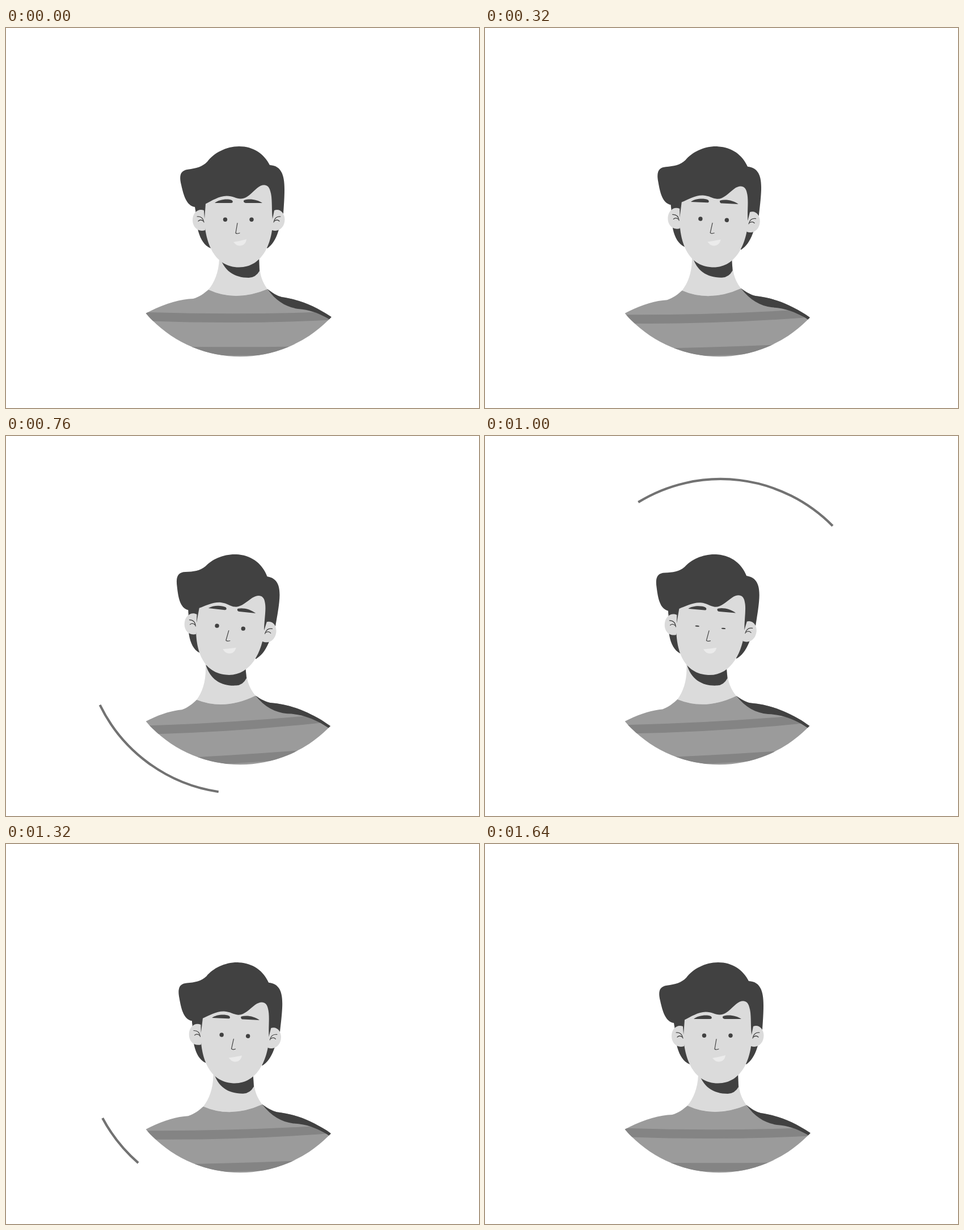
Write an HTML page that moves like this. It is 834 by 671 pixels and loops after 1.84 s.

```html
<!DOCTYPE html>
<html lang="en">
<head>
<meta charset="utf-8">
<title>Avatar</title>
<style>
  html, body { margin: 0; width: 100%; height: 100%; overflow: hidden; background: #fff; }
  svg { display: block; width: 100%; height: 100%; }
  .dark { fill: #414141; }
  .skin { fill: #dbdbdb; }
  .shirt { fill: #9b9b9b; }
  .stripe { fill: #848484; }
  .line { fill: none; stroke: #414141; stroke-width: 1.2; stroke-linecap: round; stroke-linejoin: round; }
</style>
</head>
<body>
<svg viewBox="0 0 834 671">
  <defs>
    <clipPath id="disc"><circle cx="413" cy="360.500" r="219.700"/></clipPath>
    <clipPath id="cloth"><use href="#top"/></clipPath>
  </defs>

  <path id="ring" fill="none" stroke="#727272" stroke-width="4.2"/>

  <g clip-path="url(#disc)">
    <g id="body">
      <path class="skin" d="M376 395 V408 C375 432 367 450 357 462 Q405 484.500 461 461 C451 447 447 435 446 408 V395Z"/>
      <path class="dark" d="M377 402 C383 428 402 441 428 441 Q440 441 447 429 L446 402Z"/>
      <path id="top" class="shirt" d="M200 533 C248 498 295 479 330 478 C341 475 350 468 357 462 Q405 484.500 461 461 C470 468 478 473 486 475 C520 480 545 491 574 510.500 L620 545 V660 H200Z"/>
      <g clip-path="url(#cloth)">
        <path class="stripe" d="M200 500 Q410 509 620 499 V513 Q410 526 200 515Z"/>
        <path class="stripe" d="M200 561 Q410 566 620 560 V574 Q410 582 200 575Z"/>
        <path class="dark" d="M461 461 C476 482 494 493 515 496 C540 498 556 506 573 516 L620 550 V440 H461Z"/>
      </g>
    </g>
  </g>

  <g id="head">
    <path class="dark" d="M334 312 C334 345 339 380 361 389 L400 350 L461 389 C478 377 485 350 488 312Z"/>
    <path class="skin" d="M351 290 L349.500 335 C351 380 368 422.500 411 422.500 C453 422.500 471 378 470.500 335 L470 265 H400Z"/>
    <path class="dark" d="M333 316 C318 314 313 295 309 277 C305 261 307 251.500 321 249.700 C335 247.700 346 245.500 355 236 C366 221 388 209 411 209 C436 209 455 222 465 242 C484 243 491 257 491 285 C491 300 490 312 489 328 L474 322 L470 338 C468 318 470 300 466 288 C463 275.500 453 274.500 443 282.500 C433 291 425 301.500 414 301.500 C406 301.500 400 296.500 389 296.500 C376 296.500 362 305.500 352 310.500 L350 337 L346 322 L334 322Z"/>
    <path class="skin" d="M349 322 C338 318 329 327 329 339 C329 352 339 361 351 357 L353 345 L350 337Z"/>
    <path class="skin" d="M473 322 C483 318 491.500 327 491.500 338 C491.500 351 482 361 469 357 L467 345 L470 337Z"/>
    <path class="line" d="M337 333 Q347 332 349 343 M339 341 Q343 337 348 341 M484 333 Q474 332 472 343 M482 341 Q478 337 473 341"/>
    <path class="dark" d="M368 309 C375 303 390 301 398 304 C401 306 400 309 397 309Z"/>
    <path class="dark" d="M420 304 C430 301 443 303 452 309 H423 C419 309 418 305 420 304Z"/>
    <ellipse class="dark eye" cx="386.500" cy="338.200" rx="3.700"/>
    <ellipse class="dark eye" cx="433" cy="338.200" rx="3.700"/>
    <path class="line" d="M408 344.500 L405 362 Q407 364 412 362"/>
    <path fill="#ebebeb" d="M401 378 Q413 376 424 373 C423 381 418 384.500 412 384.500 C406 384.500 403 380 401 378Z"/>
  </g>
</svg>

<script>
const LOOP = 1840, STEP = 40, END = 1640, R = 277.6;
const $ = id => document.getElementById(id);
const ring = $('ring'), body = $('body'), head = $('head');
const eyes = document.querySelectorAll('.eye');

// Keys are [time, value]
const sway = [[0, 0], [320, .455], [480, .69], [780, 1], [1000, .85], [1320, .435], [1640, 0]];
const lead = [[440, -2], [480, 1.5], [620, 19], [760, 81.6], [1000, 301.5], [1160, 376], [1320, 409], [1440, 413]];
const trail = [[480, -2], [640, 4], [760, 25.9], [1000, 224.6], [1120, 314], [1320, 388], [1440, 413]];
const lids = [[880, 1], [1000, .3], [1120, 1]];

// Smooth curve through the keys that never overshoots
function curve(keys, t) {
  const n = keys.length - 1;
  if (t <= keys[0][0]) return keys[0][1];
  if (t >= keys[n][0]) return keys[n][1];
  const slope = i => (keys[i + 1][1] - keys[i][1]) / (keys[i + 1][0] - keys[i][0]);
  const tangent = i => {
    if (i === 0) return slope(0);
    if (i === n) return slope(n - 1);
    const a = slope(i - 1), b = slope(i);
    return a * b <= 0 ? 0 : 2 * a * b / (a + b);
  };
  let i = 0;
  while (t > keys[i + 1][0]) i++;
  const [t0, v0] = keys[i], [t1, v1] = keys[i + 1];
  const d = t1 - t0, u = (t - t0) / d, w = 1 - u;
  return w * w * (1 + 2 * u) * v0 + u * u * (3 - 2 * u) * v1
    + d * u * w * (w * tangent(i) - u * tangent(i + 1));
}

// Degrees run from the left side, down and around
function ringPoint(deg) {
  const a = deg * Math.PI / 180;
  return (415.3 - R * Math.cos(a)).toFixed(2) + ' ' + (353.6 + R * Math.sin(a)).toFixed(2);
}

function draw(t) {
  const p = curve(sway, t);
  body.setAttribute('transform', `rotate(${-3.4 * p} 410 815)`);
  head.setAttribute('transform', `rotate(${6.2 * p} 408 203)`);

  const open = 3.7 * curve(lids, t);
  eyes.forEach(e => e.setAttribute('ry', open));

  const from = curve(trail, t), to = curve(lead, t);
  ring.setAttribute('d', to - from > .1
    ? `M${ringPoint(from)} A${R} ${R} 0 0 0 ${ringPoint(to)}` : '');
}

const start = performance.now();
function tick(now) {
  const t = Math.max(0, now - start) % LOOP;
  draw(Math.min(END, Math.floor(t / STEP) * STEP));
  requestAnimationFrame(tick);
}
draw(0);
requestAnimationFrame(tick);
</script>
</body>
</html>
```
